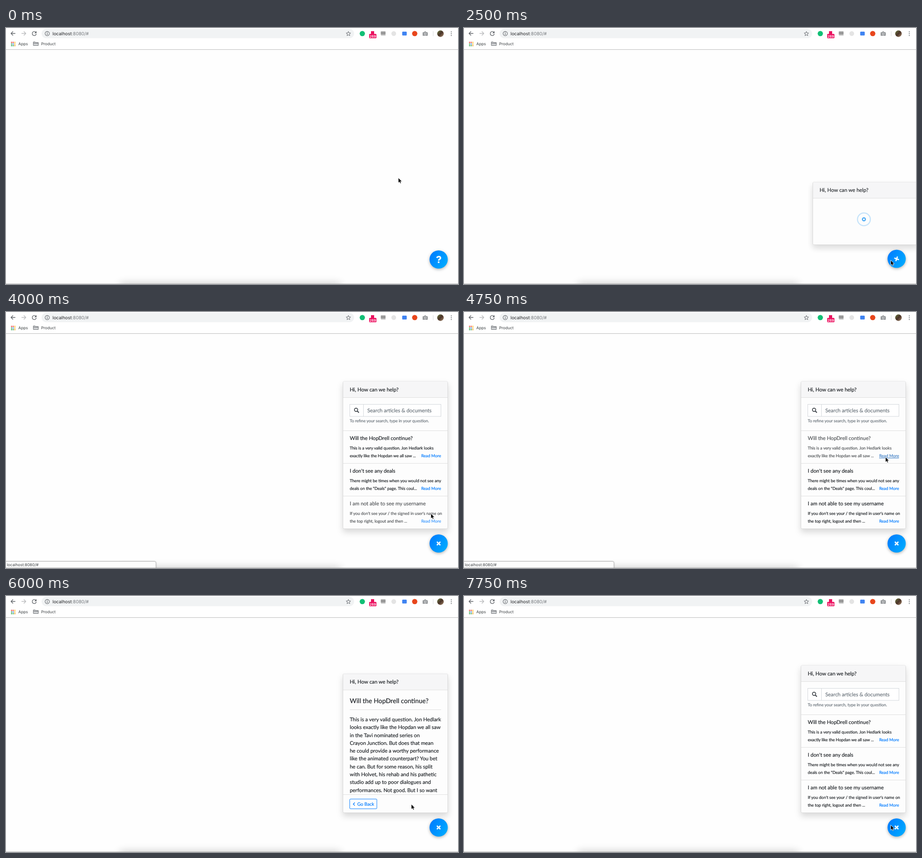
Recreate the animation shown at these times as an HTML page. Size 992 by 564 pixels, loop 8 s.

```html
<!DOCTYPE html>
<html lang="en">
<head>
<meta charset="utf-8">
<title>Help widget</title>
<style>
  html, body { margin: 0; width: 100%; height: 100%; overflow: hidden; background: #fefefe; }
  svg { display: block; text-rendering: geometricPrecision; font: 11.35px Lato, sans-serif; color: #212529; }
  .ui { font-family: Inter, sans-serif; font-size: 8.64px; fill: #3c4043; }
  .line { fill: none; stroke: #5f6368; stroke-width: 1.4; }
  .rule { fill: none; stroke: #dfdfdf; }
  #panel text { fill: currentColor; stroke: currentColor; stroke-width: .22; }
  .small { font-size: 9.1px; }
  .muted { color: #6c757d; }
  .link { color: #007bff; }
  .item.hover { opacity: .76; }
  .item.over .link { color: #0056b3; text-decoration: underline; }
  .back { color: #007bff; }
  .back rect { fill: #fefefe; stroke: #007bff; }
  .back path { fill: none; stroke: currentColor; stroke-width: 1.4; }
  .back text { font-size: 10.08px; }
  .back.hover { color: #fff; }
  .back.hover rect { fill: #007bff; }
  #card { filter: drop-shadow(0 7px 7px rgba(0, 0, 0, .15)); }
  #disc { filter: drop-shadow(0 2.5px 3px rgba(0, 0, 0, .3)); }
  #status rect { filter: drop-shadow(0 0 1.5px rgba(0, 0, 0, .2)); }
</style>
</head>
<body>
<svg width="992" height="564" viewBox="0 0 992 564">
  <defs>
    <linearGradient id="blue" x2="1" y2=".6"><stop stop-color="#0078ff"/><stop offset="1" stop-color="#00a8ff"/></linearGradient>
    <linearGradient id="photo" x2="1" y2="1"><stop stop-color="#6d7f45"/><stop offset=".5" stop-color="#4a3328"/><stop offset="1" stop-color="#a98a6c"/></linearGradient>
    <filter id="soft" x="-10%" y="-150%" width="120%" height="400%"><feGaussianBlur stdDeviation="9"/></filter>
    <clipPath id="scroll"><rect x="740" y="251" width="229" height="186"/></clipPath>
  </defs>

  <rect width="992" height="564" fill="#fefefe"/>
  <rect x="250" y="562" width="484" height="20" fill="#000" opacity=".19" filter="url(#soft)"/>

  <g id="browser">
    <rect width="992" height="47" fill="#fff"/>
    <path d="M0 47.5H992" stroke="#bcbcbc"/>
    <rect x="78" y="2" width="686" height="20.5" rx="10.2" fill="#f1f3f4"/>
    <path class="line" d="M20.500 12H11.500M15.500 7.500L11 12l4.500 4.500"/>
    <path class="line" style="stroke:#babcbe" d="M34 12H43M39 7.500L43.500 12L39 16.500"/>
    <path class="line" d="M65.300 9A4.500 4.500 0 1 0 66.500 13"/>
    <path d="M67 6.800V11.500H62.300z" fill="#5f6368"/>
    <circle class="line" style="stroke-width:1.1" cx="90.500" cy="12.300" r="4.700"/>
    <path class="line" d="M90.500 9.300v1.300M90.500 11.700v3.300"/>
    <text class="ui" x="102" y="16" style="font-size:9.9px;fill:#202124">localhost<tspan fill="#74787c">:8080/#</tspan></text>
    <path class="line" style="stroke-width:1" d="M751.500 7.500l1.300 3.300 3.600.3-2.700 2.300.8 3.500-3-1.900-3 1.900.8-3.500-2.700-2.300 3.600-.3z"/>
    <circle cx="782" cy="12.300" r="5.800" fill="#11bf75"/>
    <rect x="801" y="7" width="7" height="6" fill="#e8145f"/>
    <rect x="797" y="13" width="16" height="9.500" rx="1.500" fill="#ec0b5c"/>
    <text x="805" y="20.500" text-anchor="middle" style="font:600 7.500px Inter,sans-serif;fill:#fff">269</text>
    <rect x="822.500" y="7.500" width="10.500" height="7.500" rx="1" fill="#9a9a9a"/>
    <path d="M823 16.500h10" stroke="#b0b0b0"/>
    <circle cx="851" cy="12.300" r="5.200" fill="#e4e4e4"/>
    <rect x="869.500" y="8" width="10" height="8.500" rx="1.500" fill="#3f83f2"/>
    <circle cx="897" cy="12.300" r="5.800" fill="#e8461c"/>
    <path d="M914.500 9.500h2.700l1.200-1.700h3.200l1.200 1.700h2.700v7.500h-11z" fill="#8c8f92"/>
    <circle cx="920" cy="13" r="2.300" fill="#8c8f92" stroke="#fff"/>
    <path d="M937.500 7V18" stroke="#d8dadc"/>
    <circle cx="953.500" cy="12.500" r="7.200" fill="url(#photo)"/>
    <g fill="#5f6368"><circle cx="977.300" cy="8.500" r="1.100"/><circle cx="977.300" cy="12.500" r="1.100"/><circle cx="977.300" cy="16.500" r="1.100"/></g>
    <g id="grid"></g>
    <text class="ui" x="27" y="38">Apps</text>
    <path d="M60 38.500v-7.800h4l1.200 1.300h5.800v6.500zM60 33.500h11" fill="#d0d2d4" stroke="#5f6368" stroke-width=".9"/>
    <text class="ui" x="77" y="38">Product</text>
  </g>

  <g id="panel">
    <rect id="card" x="739.5" width="230" rx="2.500" fill="#fdfdfd" stroke="#d9d9d9"/>
    <g id="header">
      <path d="M740 36V2.500a2 2 0 0 1 2-2H967a2 2 0 0 1 2 2V36z" fill="#f6f6f7"/>
      <path class="rule" d="M740 36H969"/>
      <text x="754.500" y="22.400">Hi, How can we help?</text>
    </g>
    <g id="loader" fill="none" stroke="#2196f3" stroke-width="2.500">
      <circle cx="851.700" cy="421.500"/><circle cx="851.700" cy="421.500"/>
    </g>
    <g id="list">
      <rect x="754.500" y="203.500" width="200" height="26.500" fill="#fff" stroke="#d3d7db"/>
      <path d="M784.500 203.500V230" stroke="#d3d7db"/>
      <circle cx="768.300" cy="215.500" r="3.600" fill="none" stroke="#40464c" stroke-width="1.700"/>
      <path d="M771 218.200l3.500 3.500" stroke="#40464c" stroke-width="2.200"/>
      <text class="muted" x="793" y="221.400">Search articles &amp; documents</text>
      <text class="muted small" x="754.500" y="243.400">To refine your search, type in your question.</text>
    </g>
    <g id="article">
      <text x="754.500" y="236" style="font-size:14.2px">Will the HopDrell continue?</text>
      <path class="rule" d="M754.500 250.500H955"/>
      <g id="story" clip-path="url(#scroll)"></g>
      <path class="rule" d="M740 437.500H969"/>
      <g class="back">
        <rect x="754.400" y="447.300" width="59.500" height="21.500" rx="1.800"/>
        <path d="M765.500 455l-3.300 3.400 3.300 3.400"/>
        <text x="771" y="462">Go Back</text>
      </g>
    </g>
  </g>

  <g id="button">
    <circle id="disc" r="20" fill="url(#blue)"/>
    <g id="ask">
      <path d="M-4 -3.600C-3 -5.500 -1.700 -6.400 .2 -6.400C4.700 -6.400 5 -2.400 2.400 -.8C.6 .3 0 .8 0 2.600" fill="none" stroke="#fff" stroke-width="3.200"/>
      <circle cy="6" r="2" fill="#fff"/>
    </g>
    <path id="cross" d="M-3.800 -3.800L3.800 3.800M3.800 -3.800L-3.800 3.800" stroke="#fff" stroke-width="2.700"/>
  </g>

  <g id="status">
    <rect x="-4" y="549.500" width="333" height="20" rx="3" fill="#fdfdfd" stroke="#b4b4b4"/>
    <text class="ui" x="2" y="560">localhost:8080/#</text>
  </g>
  <path d="M0 563.600H992" stroke="#a0a0a0" stroke-width=".8"/>
  <path id="cursor" d="M0 0V11.300L2.600 8.900L4.200 12.600L6.200 11.700L4.600 8.200H8z" fill="#000" stroke="#fff" stroke-width=".8"/>
</svg>

<script>
const LOOP = 8000, STEP = 250, BOTTOM = 477.5;
const $ = selector => document.querySelector(selector);
const show = (selector, on) => { $(selector).style.display = on ? '' : 'none'; };
const move = (selector, x, y) => $(selector).setAttribute('transform', `translate(${x} ${y})`);

const dots = ['#e8453c', '#e8453c', '#f9bb2d', '#3aa757', '#4688f1', '#f9bb2d', '#3aa757', '#3aa757', '#e8a02d'];
$('#grid').innerHTML = dots.map((color, i) =>
  `<rect x="${11 + i % 3 * 3.6}" y="${30.5 + Math.floor(i / 3) * 3.6}" width="2.4" height="2.4" fill="${color}"/>`).join('');

const questions = [
  ['Will the HopDrell continue?', 'This is a very valid question. Jon Hedlark looks', 'exactly like the Hopdan we all saw ...'],
  ["I don't see any deals", 'There might be times when you would not see any', 'deals on the "Deals" page. This coul...'],
  ['I am not able to see my username', "If you don't see your / the signed in user's name on", 'the top right, logout and then ...'],
];
$('#list').innerHTML += questions.map(([title, first, second], i) => `
  <g transform="translate(0 ${261.5 + i * 72})">
    <path class="rule" d="M740 0H969"/>
    <g class="item">
      <text x="754.5" y="20.700">${title}</text>
      <text class="small" x="754.5" y="41.300">${first}</text>
      <text class="small" x="754.5" y="58.700">${second}</text>
      <text class="small link" x="954.700" y="58.700" text-anchor="end">Read More</text>
    </g>
  </g>`).join('');
const items = document.querySelectorAll('.item');

const story = [
  'This is a very valid question. Jon Hedlark', 'looks exactly like the Hopdan we all saw',
  'in the Tavi nominated series on', 'Crayon Junction. But does that mean',
  'he could provide a worthy performance', 'like the animated counterpart? You bet',
  'he can. But for some reason, his split', 'with Holvet, his rehab and his pathetic',
  'studio add up to poor dialogues and', 'performances. Not good. But I so want',
];
$('#story').innerHTML = story.map((line, i) =>
  `<text x="754.5" y="${276 + i * 17.28}">${line}</text>`).join('');

// Cursor stops: time, x, y
const stops = [[0, 861, 330], [250, 861, 330], [1750, 936.5, 511.5], [3500, 936.5, 511.5], [4750, 925, 319.5],
  [5250, 925, 319.5], [6000, 889.5, 458.7], [6500, 795.5, 456.7], [7000, 795.5, 456.7], [7750, 936.5, 504.5], [LOOP, 936.5, 504.5]];

function cursorAt(t) {
  const i = stops.findIndex(stop => stop[0] > t);
  const [t0, x0, y0] = stops[i - 1], [t1, x1, y1] = stops[i];
  const p = (t - t0) / (t1 - t0), e = p * p * (3 - 2 * p);
  return [x0 + (x1 - x0) * e, y0 + (y1 - y0) * e];
}

function drawPanel(t, x, y) {
  const open = t >= 2500, loading = open && t < 3000;
  const article = t >= 5250 && t < 7000, list = t >= 3000 && !article;
  const top = loading ? 339.5 : article ? 171.5 : 153;
  show('#panel', open);
  show('#loader', loading);
  show('#list', list);
  show('#article', article);
  move('#panel', t < 2750 ? 26 : 0, 0);
  $('#panel').style.opacity = t < 2750 ? .95 : 1;
  $('#card').setAttribute('y', top);
  $('#card').setAttribute('height', BOTTOM - top);
  move('#header', 0, top - .5);

  [.7, 1.38].forEach((phase, i) => {
    const p = (t / 1000 + phase) % 1, ring = $('#loader').children[i];
    ring.setAttribute('r', 16 * p);
    ring.setAttribute('opacity', 1 - p * .85);
  });

  const inside = x > 740 && x < 969 && y > 261.5 && y < BOTTOM;
  const hovered = list && inside ? Math.floor((y - 261.5) / 72) : -1;
  items.forEach((item, i) => {
    const row = y - 261.5 - i * 72;
    item.classList.toggle('hover', i === hovered);
    item.classList.toggle('over', i === hovered && x > 910 && x < 955 && row > 49 && row < 62);
  });
  $('.back').classList.toggle('hover', x > 754 && x < 814 && y > 447 && y < 469);
  show('#status', hovered >= 0);
}

function drawButton(t) {
  const open = t >= 2500;
  const lift = t < 1750 || t >= 3750 ? 0 : t < 2000 ? .7 : 1.44;
  move('#button', 949.5, 510 - lift);
  show('#ask', !open);
  show('#cross', open);
  $('#cross').setAttribute('transform', `rotate(${t < 2750 ? -25 : 0})`);
}

function frame(now) {
  const t = Math.floor(now % LOOP / STEP) * STEP;
  const [x, y] = cursorAt(t);
  drawPanel(t, x, y);
  drawButton(t);
  move('#cursor', x, y);
  requestAnimationFrame(frame);
}
frame(performance.now());
</script>
</body>
</html>
```
